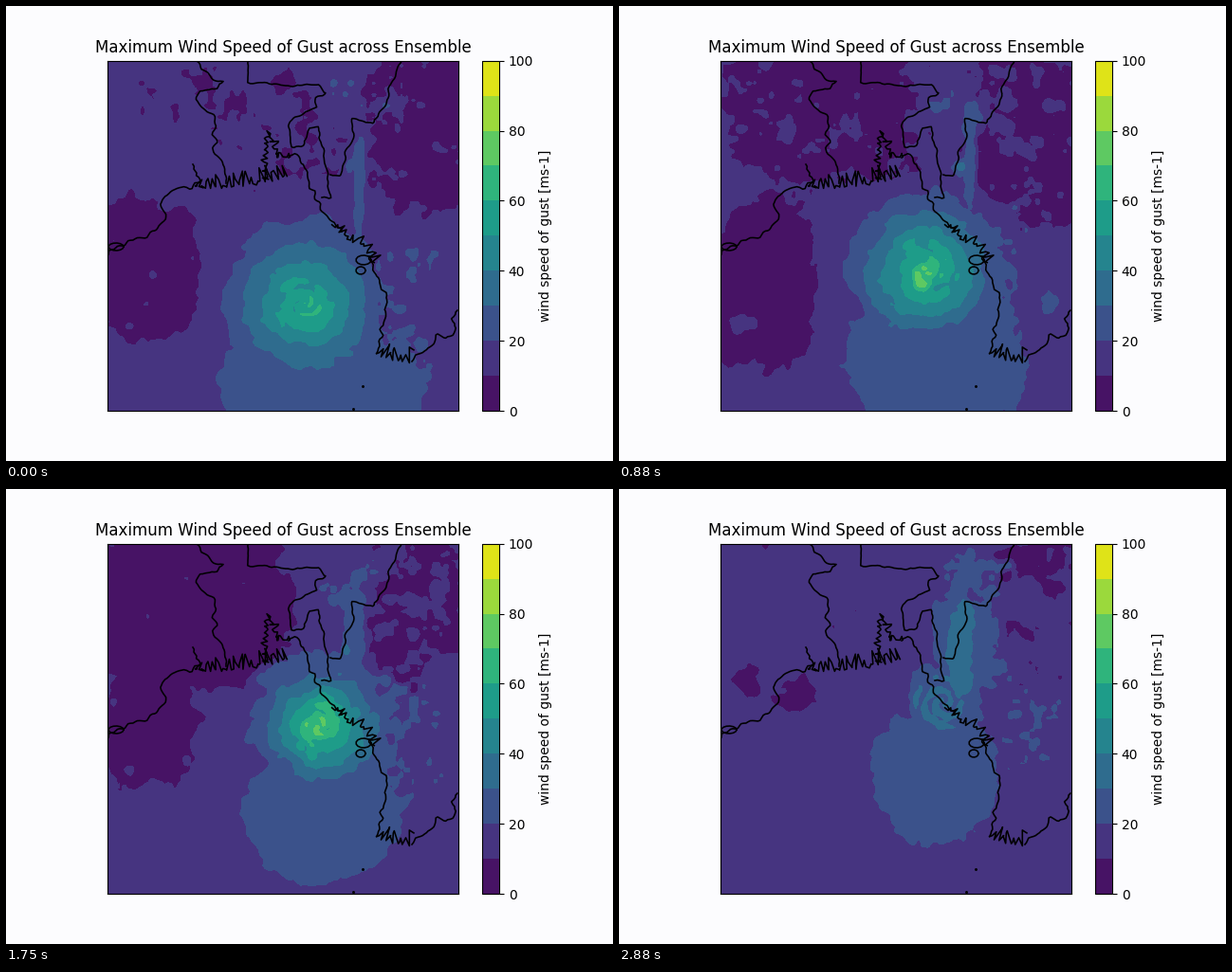
Animation, 640 px wide and 480 px high, one loop 3.01 s. Source, as a matplotlib script:

```python
import numpy as np
import matplotlib.pyplot as plt
from matplotlib.animation import FuncAnimation

STEPS, FRAMES, INTERVAL = 24, 70, 43
LEFT, RIGHT, TOP, BOTTOM = 107.2, 476.8, 57.6, 427.2
N = 186

rng = np.random.default_rng(7)
xs = np.linspace(LEFT, RIGHT, N)
ys = np.linspace(TOP, BOTTOM, N)
X, Y = np.meshgrid(xs, ys)


# ---- building blocks -------------------------------------------------
def layer(cell):
    """Smooth value noise with features about `cell` pixels wide."""
    n = int((RIGHT - LEFT) / cell) + 3
    g = rng.normal(size=(n, n))
    pos = np.linspace(0, n - 2.01, N)
    i = pos.astype(int)
    f = pos - i
    f = f * f * (3 - 2 * f)
    rows = g[i] * (1 - f[:, None]) + g[i + 1] * f[:, None]
    return rows[:, i] * (1 - f) + rows[:, i + 1] * f


def noise():
    n = layer(24) + 0.9 * layer(12) + 0.7 * layer(6)
    return n / n.std()


def blob(x, y, rx, ry, power=2):
    """Rough distance in pixels to a rounded shape, negative inside."""
    rx, ry = max(rx, 1), max(ry, 1)
    rho = (abs((X - x) / rx) ** power + abs((Y - y) / ry) ** power) ** (1 / power)
    return (rho - 1) * np.sqrt(rx * ry)


def patch(x, y, rx, ry, amount):
    """Soft-edged area where the wind is broken into speckles."""
    return amount * np.exp(-((X - x) / rx) ** 4 - ((Y - y) / ry) ** 4)


def edge(d, speckle, n):
    return np.clip(d, -18, 18) * (1 - speckle) + n * (3.5 + 8 * speckle)


def along(u, *values):
    """Follow evenly spaced key values."""
    return np.interp(u, np.linspace(0, 1, len(values)), values)


WAVES = [(noise(), noise()) for _ in range(3)]


# ---- wind field ------------------------------------------------------
def calm_air(u, n):
    """Below 10 where negative: coastal, inland and north-eastern masses."""
    coast = blob(along(u, 150, 152, 155, 145, 185), along(u, 278, 305, 268, 225, 215),
                 along(u, 52, 52, 58, 42, 24), along(u, 74, 92, 76, 50, 22), 3)
    inland = blob(along(u, 215, 215, 205, 178, 140), along(u, 90, 100, 118, 130, 205),
                  along(u, 1, 95, 130, 98, 15), along(u, 1, 75, 85, 92, 15), 3)
    east = blob(437, along(u, 130, 140, 135, 115, 80),
                along(u, 55, 58, 52, 42, 30), along(u, 88, 95, 90, 65, 25), 3)
    speckle = np.maximum(patch(260, 125, 150, 85, along(u, .5, .6, .2, .1, .25)),
                         patch(430, 130, 60, 95, along(u, .4, .6, .7, .65, .5)))
    return edge(np.minimum(np.minimum(coast, inland), east), speckle, n)


def windy_air(u, eye, size, n):
    """Above 20 where negative: storm skirt, southern tail and northern plume."""
    skirt = blob(*eye, size + 20, size + 22)
    tail = blob(335, 400 - 100 * u, 108 - 42 * u, 90 - 20 * u)
    plume = blob(372 - 8 * u, 185 - 40 * u, 5 + 30 * u ** 3, 50 + 22 * u)
    speckle = np.maximum(patch(428, 300 - 70 * u, 40, 75, .6),
                         patch(370, 95, 55, 35, .5))
    return edge(np.minimum(np.minimum(skirt, tail), plume), speckle, n)


def gusts(step):
    """Wind speed over the map at one time step."""
    u = step / (STEPS - 1)
    turn = 0.22 * step
    n1, n2, n3 = [p * np.cos(turn) + q * np.sin(turn) for p, q in WAVES]

    eye = 316 + 26 * u, 315 - 130 * u + 40 * u ** 2
    size = 66 - 14 * u - 34 * u ** 6
    peak = 61 + 14 * np.sin(np.pi * u) ** 2 - 27 * u ** 10

    v = 10 + np.clip(calm_air(u, n1), -7, 5)
    v = np.maximum(v, 20 - np.clip(windy_air(u, eye, size, n2), -7, 20))
    strong = blob(360, 170, 15 * u ** 6, 45 * u ** 6) + 4 * n3
    v = np.maximum(v, 30 - np.clip(2 * strong, -7, 30))

    dx, dy = X - eye[0], Y - eye[1]
    r = np.hypot(dx, dy)
    core = peak - (peak - 30) * (r + 3 * n3) / size
    arms = np.sin(2 * np.arctan2(dy, dx) + 0.45 * r + 0.5 * step + 0.8 * n1)
    core += (4 * arms + 2.5 * n2 - 3 * np.exp(-(r / 8) ** 2)) * np.exp(-(r / 32) ** 4)
    core = np.where(core < 30, 30 - 3 * (30 - core), core)
    return np.clip(np.maximum(v, core), 0.5, 99)


# ---- coast and borders -----------------------------------------------
def walk(pts, gap):
    """Evenly spaced points on a path with their unit normals."""
    p = np.array(pts, float)
    dist = np.concatenate([[0], np.cumsum(np.hypot(*np.diff(p, axis=0).T))])
    t = np.linspace(0, dist[-1], int(dist[-1] / gap) + 2)
    xy = np.column_stack([np.interp(t, dist, c) for c in p.T])
    d = np.gradient(xy, axis=0)
    normal = np.column_stack([d[:, 1], -d[:, 0]])
    return xy, normal / (np.hypot(*normal.T)[:, None] + 1e-6)


def wiggly(pts, size=1.4):
    xy, normal = walk(pts, 2.5)
    push = size * np.convolve(rng.normal(size=len(xy)), [.4, .7, .4], "same")
    push[[0, -1]] = 0
    return xy + normal * push[:, None]


def inlets(pts, height, gap=2.0):
    """A shore cut by narrow channels of uneven length."""
    xy, normal = walk(pts, gap)
    push = height * rng.uniform(0, 1, len(xy)) ** 1.3 * (np.arange(len(xy)) % 3 > 0)
    return xy + normal * push[:, None] + rng.normal(0, 1, xy.shape)


def ring(x, y, rx, ry):
    a = np.linspace(0, 2 * np.pi, 14)
    return np.column_stack([x + rx * np.cos(a), y + ry * np.sin(a)])


WEST = [(108, 262), (125, 252), (143, 243), (158, 238), (167, 227), (169, 219),
        (163, 210), (167, 200), (183, 193), (200, 187), (203, 180), (197, 167)]
DELTA = [(200, 188), (206, 193), (236, 191), (262, 187), (282, 184), (297, 178)]
ESTUARY = [(275, 184), (276, 160), (278, 134), (281, 150), (286, 160), (298, 160)]
EAST = [(298, 160), (305, 156), (316, 167), (320, 192), (333, 214), (354, 238)]
ISLANDS = [(344, 232), (361, 246), (378, 254), (386, 272)]
SOUTHEAST = [(383, 264), (390, 282), (400, 305), (402, 322), (391, 366)]
MOUTHS = [(391, 367), (406, 374), (428, 375)]
GULF = [(428, 375), (437, 366), (452, 356), (454, 346), (463, 351), (474, 340),
        (472, 330), (476, 321)]
BORDER_WEST = [(201, 58), (206, 67), (218, 78), (229, 80), (220, 87), (205, 90),
               (200, 98), (206, 106), (220, 116), (222, 126), (218, 135),
               (223, 143), (217, 150), (229, 164), (232, 187)]
BORDER_NORTH = [(255, 58), (255, 80), (305, 84), (330, 83), (338, 92), (326, 97),
                (327, 106), (303, 117), (297, 127), (302, 149), (315, 146),
                (320, 128), (330, 127), (332, 143), (338, 168), (342, 203),
                (333, 202)]
BORDER_EAST = [(342, 178), (353, 180), (360, 150), (367, 140), (364, 118),
               (388, 124), (404, 98), (404, 86), (417, 58)]

fig, ax = plt.subplots(figsize=(6.4, 4.8), dpi=100, facecolor="#fcfcfe")
levels = np.arange(0, 101, 10)
maps = [ax.contourf(xs, ys, gusts(s), levels=levels, cmap="viridis")
        for s in range(STEPS)]

lines = [wiggly(p) for p in (WEST, EAST, SOUTHEAST, GULF)]
lines += [wiggly(p, 0.8) for p in (BORDER_WEST, BORDER_NORTH, BORDER_EAST)]
lines += [inlets(DELTA, 16), inlets(ESTUARY, 7), inlets(ISLANDS, 12),
          inlets(MOUTHS, 17)]
lines += [ring(116, 254, 8, 4), ring(374, 279, 5, 4), ring(377, 268, 8, 5)]
for line in lines:
    ax.plot(*line.T, color="black", lw=1.15, solid_joinstyle="round")
ax.plot([375.5, 366], [401, 425], "k.", ms=2.2)

ax.set(xlim=(LEFT, RIGHT), ylim=(BOTTOM, TOP), xticks=[], yticks=[], aspect="equal")
ax.set_title("Maximum Wind Speed of Gust across Ensemble")
fig.colorbar(maps[0], ax=ax, ticks=range(0, 101, 20),
             label="wind speed of gust [ms-1]")


def draw(frame):
    step = min(round(frame * STEPS / FRAMES), STEPS - 1)
    for s, m in enumerate(maps):
        m.set_visible(s == step)
    return maps


anim = FuncAnimation(fig, draw, frames=FRAMES, interval=INTERVAL,
                     repeat=True, repeat_delay=0, blit=False)
plt.show()
```
